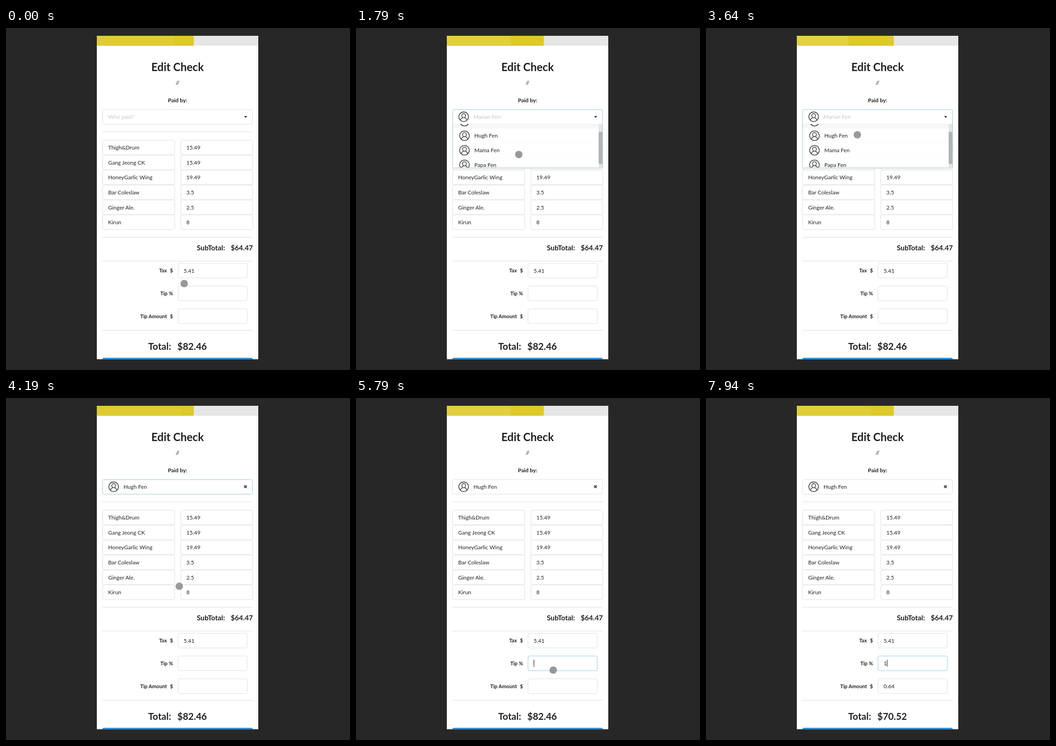
These frames come from a looping animation (750 by 746 pixels, 7.99 s). An HTML page:

```html
<!DOCTYPE html>
<html lang="en">
<head>
<meta charset="utf-8">
<title>Edit Check</title>
<style>
  html, body { margin: 0; width: 100%; height: 100%; overflow: hidden; background: #272727; }
  svg { display: block; width: 100%; height: 100%; }
  text { font-family: Lato, sans-serif; font-size: 12px; fill: #212121; white-space: pre; }
  .bold { font-weight: 700; }
  .label { font-weight: 700; font-size: 11.14px; }
  .hint { fill: #c6c6c6; }
  .box { fill: #fff; stroke: #dedede; }
  .focus { stroke: #96c8da; }
  .icon { fill: none; stroke: #444; stroke-width: 1.6; }
</style>
</head>
<body>
<svg viewBox="0 0 750 746">
  <defs>
    <clipPath id="panelClip"><rect x="198" y="17" width="352" height="705.6"/></clipPath>
    <clipPath id="listClip"><rect x="211" y="209.5" width="326" height="95"/></clipPath>
    <g id="user" class="icon">
      <circle r="10.5"/>
      <ellipse cy="-2.4" rx="4.1" ry="4.6"/>
      <path d="M-7 7.8C-6.4 4-4.4 3-2.2 2.2M7 7.8C6.4 4 4.4 3 2.2 2.2"/>
    </g>
  </defs>
  <g clip-path="url(#panelClip)">
    <rect x="198" y="17" width="352" height="706" fill="#fff"/>
    <rect x="198" y="17" width="352" height="21.8" rx="3" fill="#e6e6e6"/>
    <rect x="198" y="17" width="211.5" height="21.8" rx="3" fill="#ddc928"/>
    <rect id="sheen" x="198" y="17" height="21.8" rx="2" fill="#fff"/>
    <g id="form"></g>
    <rect x="210" y="719.5" width="328" height="33" rx="3.4" fill="#2185d0"/>

    <rect id="payer" class="box" x="210.5" y="178" width="327" height="31.8" rx="3.4"/>
    <use id="payerIcon" href="#user" x="234.7" y="193.6"/>
    <text id="payerName" y="198.2"></text>
    <path id="arrow" d="M519 192h7l-3.5 4z" fill="#333"/>
    <path id="clear" d="M519.2 190.6l5.6 5.6m0-5.6l-5.6 5.6" stroke="#505050" stroke-width="2.5"/>

    <g id="menu">
      <rect x="210" y="211" width="328" height="96" rx="3.4" fill="#222426" opacity=".13"/>
      <path d="M210.5 209.5V301.5a3 3 0 0 0 3 3H534.5a3 3 0 0 0 3-3V209.5" class="box focus"/>
      <g clip-path="url(#listClip)">
        <g id="list"></g>
        <rect x="529" y="209.5" width="8" height="95" fill="#e6e6e6"/>
        <rect id="thumb" x="529" y="209.5" width="8" height="71" rx="3.5" fill="#b4b4b4"/>
      </g>
    </g>
    <rect id="tipCaret" y="571" width="1.1" height="15" fill="#111"/>
  </g>
  <circle id="dot" r="8.1" fill="#808080" fill-opacity=".8"/>
</svg>
<script>
const LOOP = 7990;
const OPEN = 840, PICK = 3790, FOCUS = 5390, TYPE = 7640;
const SCROLL = 22.3, ROW = 31.75;
const people = ['Marian Fen', 'Hugh Fen', 'Mama Fen', 'Papa Fen'];
const items = [['Thigh&Drum', '15.49'], ['Gang Jeong CK', '15.49'], ['HoneyGarlic Wing', '19.49'],
  ['Bar Coleslaw', '3.5'], ['Ginger Ale.', '2.5'], ['Kirun', '8']];
// Pointer path: time, x, y
const path = [[0, 388.5, 557.5], [700, 361, 192], [1040, 361, 192], [1400, 356, 288], [1790, 355, 276],
  [2090, 350, 296], [2700, 345, 292], [3500, 330, 233], [3840, 330, 233], [4390, 398, 486],
  [4760, 440, 562], [4990, 434, 574], [5440, 434, 575], [5790, 430, 593.5], [6090, 430, 632.5],
  [6540, 430, 632.5], [7290, 432, 631], [LOOP, 432, 631]];

const $ = id => document.getElementById(id);
const clamp = v => Math.max(0, Math.min(1, v));
const smooth = v => (v = clamp(v), v * v * (3 - 2 * v));

function add(parent, tag, attrs, text = '') {
  const el = document.createElementNS('http://www.w3.org/2000/svg', tag);
  set(el, attrs);
  el.textContent = text;
  return parent.appendChild(el);
}
function set(el, attrs) {
  for (const key in attrs) el.setAttribute(key, attrs[key]);
}
const show = (el, on) => { el.style.display = on ? '' : 'none'; };

const form = $('form');
const write = (text, x, y, attrs = {}) => add(form, 'text', { x, y, ...attrs }, text);
const size = px => ({ class: 'bold', style: `font-size:${px}px` });
const rightAlign = { class: 'label', 'text-anchor': 'end' };

function input(x, y, width, value) {
  const box = add(form, 'rect', { class: 'box', x, y, width, height: 32, rx: 3.4 });
  return { box, value: write(value, x + 12.2, y + 20.6) };
}

write('Edit Check', 374, 93.6, { ...size(24), 'text-anchor': 'middle' });
write('//', 374, 124.3, { 'text-anchor': 'middle' });
write('Paid by:', 374, 161.8, { class: 'bold', 'text-anchor': 'middle' });
for (const y of [226.5, 456.5, 508.5, 659.5])
  add(form, 'path', { d: `M210 ${y}H538`, stroke: '#dedede' });
items.forEach(([name, price], i) => {
  const y = 244.7 + i * 32.58;
  input(210.5, y, 157.5, name);
  input(381, y, 157, price);
});
write('SubTotal:', 416, 485.2, size(15.43));
write('$64.47', 538.3, 485.2, { ...size(15.43), 'text-anchor': 'end' });
write('Tax', 350.8, 533.2, rightAlign);
write('$', 364, 533.2, rightAlign);
write('Tip %', 364, 583, rightAlign);
write('Tip Amount', 350.8, 632.8, rightAlign);
write('$', 364, 632.8, rightAlign);
input(375, 513.2, 151, '5.41');
const tip = input(375, 562.8, 151, '');
const amount = input(375, 612.5, 151, '');
write('Total:', 310, 702, size(20.57));
const total = write('', 373.5, 702, size(20.57));

const list = $('list');
people.forEach((name, i) => {
  const y = 209.5 + i * ROW;
  add(list, 'rect', { x: 211, y, width: 326, height: ROW, fill: i ? '#fff' : '#f7f7f7' });
  add(list, 'path', { d: `M211 ${y}h326`, stroke: '#fafafa' });
  add(list, 'use', { href: '#user', x: 236.5, y: y + 16 });
  add(list, 'text', { x: 258, y: y + 20.4 }, name);
});

// CSS "ease" curve, solved by bisection
function ease(x) {
  let lo = 0, hi = 1, s;
  for (let i = 0; i < 20; i++) {
    s = (lo + hi) / 2;
    if (.75 * s * (1 - s) + s ** 3 < x) lo = s; else hi = s;
  }
  return .3 * s * (1 - s) ** 2 + 3 * s * s * (1 - s) + s ** 3;
}

function draw(t) {
  const sweep = ease((t + 980) % 2000 / 2000);
  set($('sheen'), { width: 211.5 * sweep, opacity: .3 * (1 - sweep) });

  const opened = t >= OPEN, picked = t >= PICK, focused = t >= FOCUS, typed = t >= TYPE;
  $('payerName').textContent = picked ? people[1] : opened ? people[0] : 'Who paid?';
  set($('payerName'), { x: opened ? 256.2 : 222.7, class: picked ? '' : 'hint' });
  set($('payer'), { class: opened && !focused ? 'box focus' : 'box' });
  show($('payerIcon'), opened);
  show($('arrow'), !picked);
  show($('clear'), picked);

  const fold = 1 - clamp((t - PICK) / 130);
  show($('menu'), opened && fold > 0);
  set($('menu'), { opacity: fold, transform: `translate(0 ${209.5 * (1 - fold)}) scale(1 ${fold})` });
  const scroll = SCROLL * smooth((t - 1440) / 320);
  set($('list'), { transform: `translate(0 ${-scroll})` });
  set($('thumb'), { y: 209.5 + scroll * .74 });

  set(tip.box, { class: focused ? 'box focus' : 'box' });
  tip.value.textContent = typed ? '1' : '';
  amount.value.textContent = typed ? '0.64' : '';
  total.textContent = typed ? '$70.52' : '$82.46';
  const blinkOn = t < 5540 || (t - 5540) % 1000 < 500;
  show($('tipCaret'), focused && (typed || blinkOn));
  set($('tipCaret'), { x: typed ? 394.4 : 387.4 });

  const i = path.findIndex(p => p[0] > t);
  const [t0, x0, y0] = path[i - 1], [t1, x1, y1] = path[i];
  const k = smooth((t - t0) / (t1 - t0));
  set($('dot'), { cx: x0 + (x1 - x0) * k, cy: y0 + (y1 - y0) * k });
  show($('dot'), !typed);
}

const start = performance.now();
function tick() {
  draw((performance.now() - start) % LOOP);
  requestAnimationFrame(tick);
}
tick();
</script>
</body>
</html>
```
